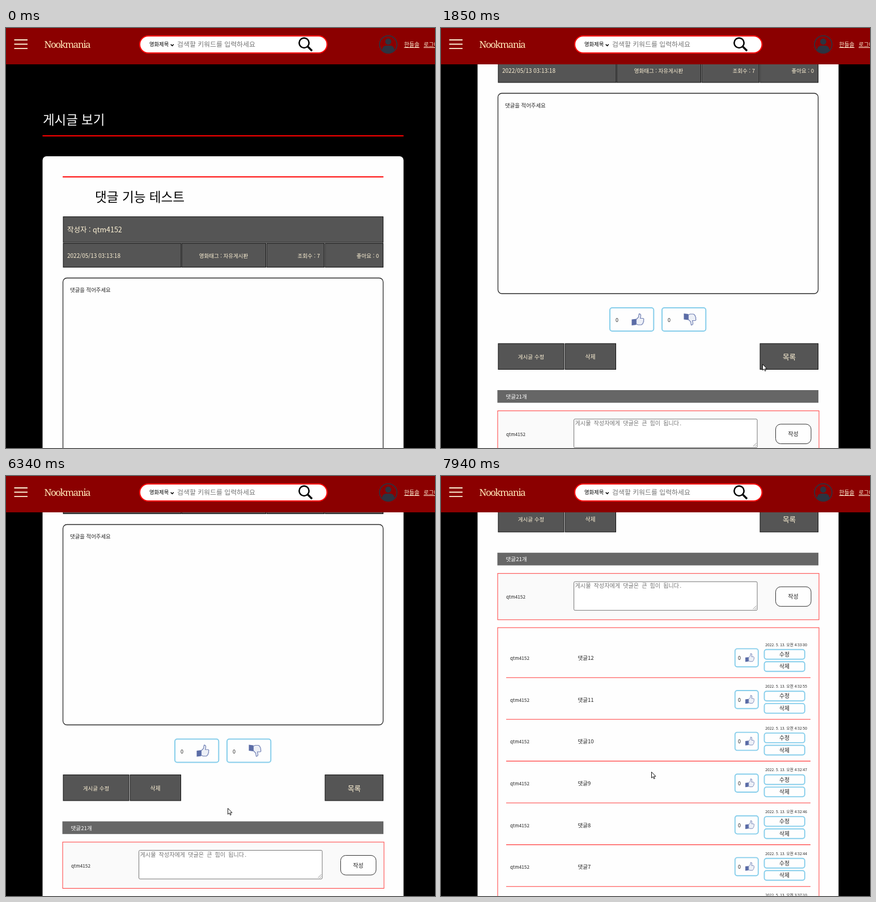
An HTML page that plays this animation: 757x740 px, repeating every 8000 ms.

```html
<!DOCTYPE html>
<html lang="ko">
<meta charset="utf-8">
<style>
  html, body { margin: 0; width: 100%; height: 100%; overflow: hidden; background: #000; }
  svg { display: block; }
  text { font-family: 'Noto Sans CJK KR', 'Noto Sans CJK', 'Noto Sans', sans-serif; white-space: pre; }
  .mono { font-family: 'Noto Sans Mono CJK KR', 'Noto Sans CJK KR', 'Noto Sans Mono', monospace; }
  .brand { font-family: 'Noto Serif', serif; letter-spacing: -1.5px; }
  .link { text-decoration: underline; }
</style>
<body>
<svg id="stage" width="757" height="740" viewBox="0 0 757 740">
  <defs>
    <g id="thumb">
      <path d="M0 10.5L8 9.5V20L0 21Z" fill="#5b6ca6"/>
      <path d="M8 10.5L12 6.500L13 .7Q16.500 .5 16 4.500L15.200 8.500H20Q22.300 9.500 20.800 12Q22 13.500 20.300 15.200Q20.800 17 19 18Q18.500 20 16.500 20H11L8 18.500Z"
        fill="#edf0f7" stroke="#6d7db2" stroke-width="1.2"/>
    </g>
  </defs>
  <g id="page"></g>
  <g id="header"></g>
  <path id="arrow" d="M.5 .5V11L3 8.800L4.700 12.500L6.300 11.800L4.700 8.200H8Z" fill="#fff" stroke="#000" stroke-width=".9"/>
  <path id="beam" d="M-2.500 -5H-.7L0 -4.500L.7 -5H2.500M0 -4.500V4.500M-2.500 5H-.7L0 4.500L.7 5H2.500" fill="none" stroke="#111"/>
</svg>
<script>
const $ = id => document.getElementById(id);
const SKY = '#87ceeb', CREAM = '#fff3d6', HOVER = '#aadcf0', USER = 'qtm4152';
let layer = $('page');

function add(tag, attrs, content = '') {
  const el = document.createElementNS('http://www.w3.org/2000/svg', tag);
  for (const name in attrs) el.setAttribute(name, attrs[name]);
  el.textContent = content;
  return layer.appendChild(el);
}
const rect = (x, y, width, height, fill, more) => add('rect', { x, y, width, height, fill, ...more });
const text = (x, y, size, str, fill = '#222', more) =>
  add('text', { x, y, 'font-size': size, fill, ...more }, str);
const path = (d, stroke, width = 1) => add('path', { d, stroke, 'stroke-width': width, fill: 'none' });
const thumb = (x, y, scale, flip = 1) =>
  add('use', { href: '#thumb', transform: `translate(${x} ${y}) scale(${scale} ${scale * flip})` });
const mid = { 'text-anchor': 'middle' }, end = { 'text-anchor': 'end' };
const outline = (stroke, width, rx = 0) => ({ stroke, 'stroke-width': width, rx });
const cell = (x, y, w, h) => rect(x + .5, y, w - 1, h, '#555', outline('#111', 1));

// Post
text(65, 170, 22.4, '게시글 보기', '#fff', { 'font-weight': 500 });
rect(64.5, 189, 637, 2, '#f00');
rect(64.5, 226, 637, 1600, '#fefefe', { rx: 7 });
rect(100, 261.3, 566, 2, '#f00');
text(157, 306, 22.6, '댓글 기능 테스트', '#000', { 'font-weight': 500 });
cell(100.5, 332.5, 565.5, 45.5);
text(108, 359.5, 12.5, '작성자 : ' + USER, CREAM);
cell(100.5, 379.5, 209, 42);
cell(309.5, 379.5, 149.5, 42);
cell(459.5, 379.5, 102.5, 42);
cell(562.5, 379.5, 103.5, 42);
text(108, 404.5, 10, '2022/05/13 03:13:18', CREAM);
text(384, 404.5, 9.5, '영화태그 : 자유게시판', CREAM, mid);
text(554, 404.5, 9.5, '조회수 : 7', CREAM, end);
text(658, 404.5, 9.5, '좋아요 : 0', CREAM, end);
rect(100.5, 440.5, 565, 353, '#fefefe', outline('#2a2a2a', 1.3, 7));
text(113, 465, 9.4, '댓글을 적어주세요');

// Votes
const vote = (x, flip) => {
  const box = rect(x + 1, 818.5, 77.3, 41, '#fefefe', outline(SKY, 2, 4));
  const count = text(x + 11, 843.5, 9, '0');
  thumb(x + 39.5, flip < 0 ? 849.5 : 828.5, 1, flip);
  return (n, fill) => {
    count.textContent = n;
    box.setAttribute('fill', fill || '#fefefe');
    box.setAttribute('stroke', fill ? '#fefefe' : SKY);
  };
};
const setLike = vote(297, 1), setDislike = vote(389, -1);

cell(100.5, 881.5, 117, 45.5);
cell(218.5, 881.5, 90.5, 45.5);
cell(562.5, 881.5, 103.5, 45.5);
text(159, 908.5, 9.5, '게시글 수정', CREAM, mid);
text(263.5, 908.5, 9.8, '삭제', CREAM, mid);
text(614.5, 909.5, 12.6, '목록', CREAM, mid);

// Comment form
rect(99.5, 963.5, 566.5, 22.3, '#666');
text(114.5, 978.5, 9.6, '댓글21개', '#fff');
rect(100, 1000, 567, 81.5, '#fafafa', outline('#ff3b3b', 1));
text(115, 1044.5, 8.2, USER);
rect(234.5, 1014.5, 323.5, 50.5, '#fff', outline('#767676', 1, 2));
text(236.5, 1025.5, 10.15, '게시물 작성자에게 댓글은 큰 힘이 됩니다.', '#757575', { class: 'mono', 'font-weight': 300 });
path('M550.500 1063L556.500 1057M553.500 1063.500L556.500 1060.500', '#777', .8);
rect(590.5, 1023.5, 62.5, 34.5, '#fefefe', outline('#333', 1, 9));
text(621.5, 1044.5, 10, '작성', '#222', mid);

// Comments
rect(100, 1095.5, 567, 760, 'none', outline('#ff3b3b', 1));
['4:33:00', '4:32:55', '4:32:50', '4:32:47', '4:32:46', '4:32:44', '3:37:10'].forEach((time, i) => {
  const y = 1183.5 + 73.6 * i;
  path(`M115 ${y}H652`, '#ff3b3b', 1.1);
  text(122, y - 31, 8.2, USER);
  text(241.5, y - 31, 9.5, '댓글' + (12 - i));
  rect(518.8, y - 50.8, 41, 31.8, '#fefefe', outline(SKY, 1.9, 4));
  text(524, y - 31, 9, '0');
  thumb(537, y - 43, .73);
  text(646, y - 55.5, 6.7, '2022. 5. 13. 오전 ' + time, '#222', end);
  ['수정', '삭제'].forEach((label, j) => {
    rect(570.5, y - 49.5 + 21.6 * j, 71.3, 17, '#fefefe', outline(SKY, 1.9, 4));
    text(606, y - 37.3 + 21.6 * j, 9.8, label, '#222', mid);
  });
});

// Header
layer = $('header');
rect(0, 0, 757, 64, '#8b0000');
path('M14.500 21H38M14.500 28.500H38M14.500 36.200H38', CREAM, 1.8);
text(67.5, 35, 17, 'Nookmania', '#ffe4b5', { class: 'brand' });
rect(236, 14, 330.5, 30, '#fff', outline('#f00', 2, 15));
text(253, 32.3, 9.3, '영화제목', '#000');
path('M290.700 28.800L293.300 31.400L295.900 28.800', '#000', 1.5);
text(302, 33, 11.9, '검색할 키워드를 입력하세요', '#757575');
add('circle', { cx: 526, cy: 26.3, r: 8.7, fill: 'none', stroke: '#000', 'stroke-width': 2.6 });
path('M532.500 32.800L540 40.300', '#000', 3.4);
add('circle', { cx: 674.5, cy: 29, r: 15.4, fill: 'none', stroke: '#2d3340', 'stroke-width': 1.7 });
add('circle', { cx: 674.5, cy: 24, r: 5.4, fill: '#2d3340' });
add('path', { d: 'M663.500 39Q664.500 31 671 31H678Q684.500 31 685.500 39Q681 44 674.500 44T663.500 39Z', fill: '#2d3340' });
text(702.5, 33, 9.8, '한들솔', CREAM, { class: 'link' });
text(737, 33, 9.8, '로그아웃', CREAM, { class: 'link' });

// Keys: [step, value...], linear between them
const scrollKeys = [[5, 0], [6, 15], [7, 62], [8, 101.5], [9, 118.3], [10, 118.3], [11, 135], [12, 200],
  [13, 270], [14, 325.5], [15, 349], [16, 355], [48, 355], [49, 425], [50, 473], [51, 473], [52, 505],
  [53, 570], [54, 591.5], [55, 670], [56, 702], [57, 715], [58, 762], [59, 812], [60, 828.3]];
const cursorKeys = [[1, 742, 672], [3, 704, 585], [5, 704, 585], [8, 567, 592], [15, 567, 592], [17, 466, 537],
  [20, 345, 490], [21, 345, 490], [23, 348, 577], [27, 348, 577], [30, 420, 490], [32, 420, 490],
  [35, 345, 598], [37, 345, 598], [38, 345, 596], [42, 420, 492], [44, 420, 492], [47, 391, 585],
  [48, 391, 585], [50, 387, 580], [56, 387, 580], [60, 371, 521]];

function at(keys, k) {
  const i = keys.findIndex(key => key[0] >= k);
  if (i <= 0) return keys[i ? keys.length - 1 : 0].slice(1);
  const a = keys[i - 1], b = keys[i], f = (k - a[0]) / (b[0] - a[0]);
  return a.slice(1).map((v, j) => v + (b[j + 1] - v) * f);
}

function draw() {
  // The picture moves in steps of about 132 ms
  const k = Math.floor((performance.now() % 8000 + 18) / 132.3);
  $('page').setAttribute('transform', `translate(0 ${-at(scrollKeys, k)[0]})`);

  const liked = k >= 21 && k < 31, disliked = k >= 31 && k < 43;
  setLike(+liked, liked ? SKY : k === 20 && HOVER);
  setDislike(+disliked, disliked ? SKY : (k === 30 || k === 43 || k === 44) && HOVER);

  const [x, y] = at(cursorKeys, k), typing = k >= 52 && k < 56;
  for (const [id, shown] of [['arrow', k > 0 && !typing], ['beam', typing]]) {
    $(id).setAttribute('transform', `translate(${x} ${y})`);
    $(id).setAttribute('visibility', shown ? 'visible' : 'hidden');
  }
  requestAnimationFrame(draw);
}
draw();
</script>
</body>
</html>
```
